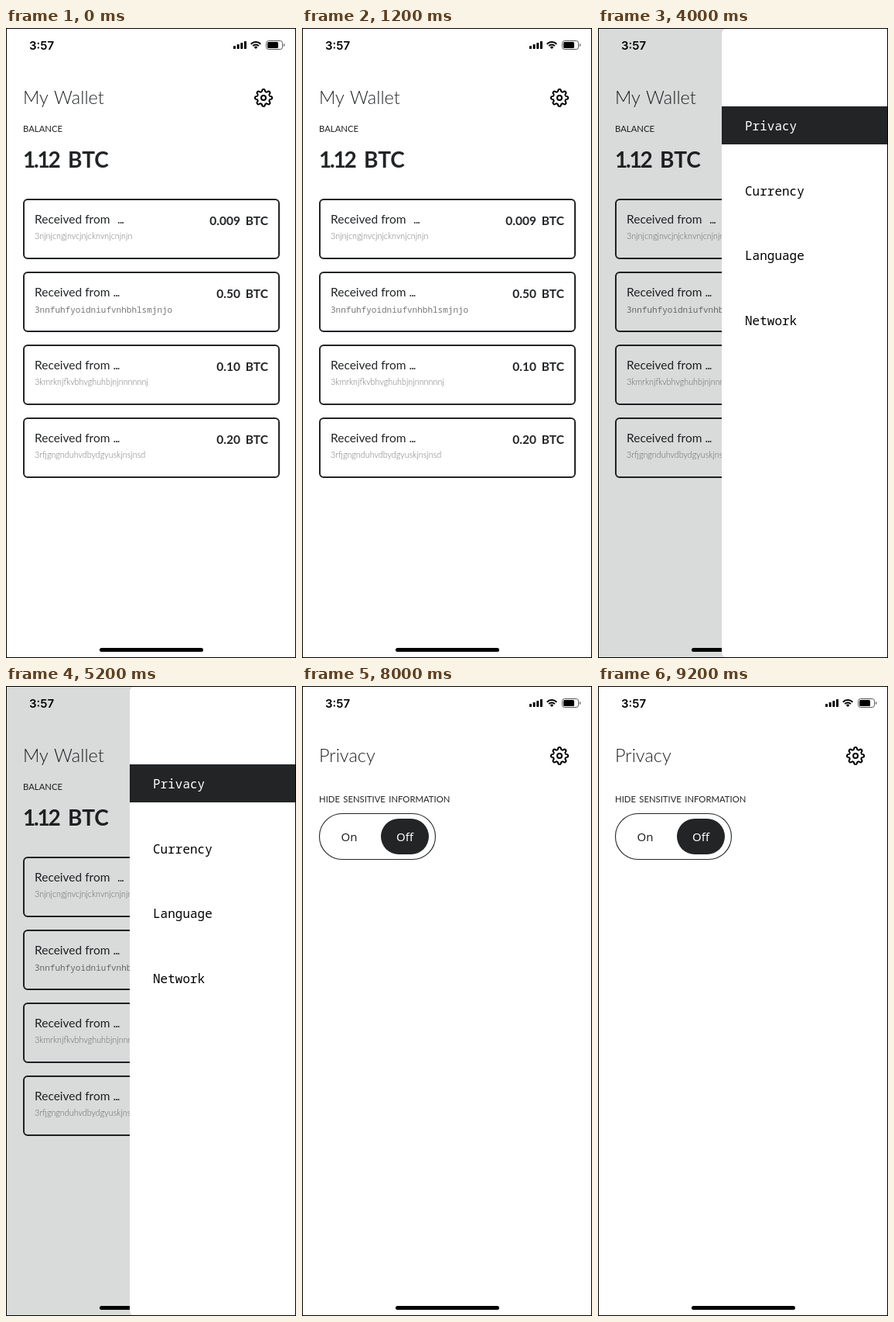
An HTML page that plays this animation: 375 px wide and 812 px high, repeating every 10000 ms.

```html
<!DOCTYPE html>
<html lang="en">
<head>
<meta charset="utf-8">
<title>Wallet privacy flow</title>
<style>
  html, body { margin: 0; width: 100%; height: 100%; overflow: hidden; background: #fff; }
  svg { display: block; width: 375px; height: 812px; }
  text { font-family: Lato, "Open Sans", sans-serif; fill: #222426; white-space: pre; }
  .clock { font: 600 15px Inter, sans-serif; fill: #000; }
  .title { font-size: 23.5px; font-weight: 300; word-spacing: 2px; }
  .label { font-size: 11.3px; word-spacing: 1.5px; }
  .total { font-size: 28px; font-weight: 700; }
  .amount { font-size: 15.5px; font-weight: 700; word-spacing: 3px; text-anchor: end; }
  .sender { font-size: 15.5px; }
  .address { font-size: 10.8px; font-weight: 300; fill: #777; }
  .mono { font: 300 11px "Noto Sans Mono", monospace; fill: #777; }
  .item { font: 400 16px "Noto Sans Mono", monospace; fill: #000; }
  .option { font: 400 15px "Noto Sans", sans-serif; text-anchor: middle; }
  .inverse { fill: #fff; }
  .line { fill: none; stroke: #222426; }
</style>
</head>
<body>
<svg id="stage" viewBox="0 0 375 812" xmlns="http://www.w3.org/2000/svg"></svg>
<script>
const INK = "#222426";
const STEP = 2000;

const rect = (x, y, w, h, attrs = "") =>
  `<rect x="${x}" y="${y}" width="${w}" height="${h}" ${attrs}/>`;
const text = (x, y, style, content) =>
  `<text x="${x}" y="${y}" class="${style}">${content}</text>`;
const group = (id, content) => `<g id="${id}">${content}</g>`;

function gear(cx, cy) {
  const points = Array.from({ length: 160 }, (_, i) => {
    const a = i / 160 * 2 * Math.PI;
    const r = 9.6 + 1.4 * Math.tanh(1.8 * Math.cos(8 * a)) / Math.tanh(1.8);
    return `${(cx + r * Math.cos(a)).toFixed(2)},${(cy + r * Math.sin(a)).toFixed(2)}`;
  });
  return `<g fill="none" stroke="#000" stroke-width="2" stroke-linejoin="round">
    <polygon points="${points.join(" ")}"/><circle cx="${cx}" cy="${cy}" r="3"/></g>`;
}

function wifi(cx, cy) {
  const arc = r => {
    const d = r * Math.SQRT1_2;
    return `M${cx - d} ${cy - d}A${r} ${r} 0 0 1 ${cx + d} ${cy - d}`;
  };
  return `<path d="${arc(8.9)}${arc(5.5)}" fill="none" stroke="#000" stroke-width="2"/>
    <path d="${arc(3.2)}L${cx} ${cy}Z"/>`;
}

function statusBar() {
  const bars = [4, 6, 8, 10]
    .map((h, i) => rect(294 + i * 4.65, 27 - h, 3, h, 'rx="0.8"')).join("");
  const battery = rect(336.5, 16.5, 21, 11, 'rx="3" fill="none" stroke="#555"')
    + rect(338, 18, 14, 8, 'rx="1.5"')
    + '<path d="M359 20q1.4 .6 1.4 2t-1.4 2z" fill="#555"/>';
  return text(30, 28, "clock", "3:57") + bars + wifi(323, 27) + battery;
}

function card(index, [amount, address, style, dotsX]) {
  const y = 220 + index * 94;
  return rect(23, y + 1, 330, 76, 'rx="5" class="line" stroke-width="2"')
    + text(37, y + 32, "sender", `Received from<tspan x="${dotsX}" letter-spacing="-1">...</tspan>`)
    + text(37, y + (style === "mono" ? 53 : 52), style, address)
    + text(339, y + 34, "amount", `${amount} BTC`);
}

const payments = [
  ["0.009", "3njnjcngjnvcjnjcknvnjcnjnjn", "address", 144],
  ["0.50", "3nnfuhfyoidniufvnhbhlsmjnjo", "mono", 138.5],
  ["0.10", "3kmrknjfkvbhvghuhbjnjnnnnnnj", "address", 138.5],
  ["0.20", "3rfjgngnduhvdbydgyuskjnsjnsd", "address", 138.5],
];

const wallet = text(22, 98, "title", "My Wallet")
  + text(22, 134, "label", "BALANCE")
  + text(22, 180, "total", '<tspan letter-spacing="-2.2">1.12</tspan><tspan x="80">BTC</tspan>')
  + payments.map((payment, i) => card(i, payment)).join("");

const privacy = text(22, 98, "title", "Privacy")
  + text(22, 150, "label", "HIDE SENSITIVE INFORMATION")
  + rect(22.5, 164.5, 150, 59, 'rx="29.5" class="line" stroke-width="1.1"')
  + rect(31, 171, 61, 46, `id="knob" rx="23" fill="${INK}"`)
  + '<text id="on" x="61" y="200" class="option">On</text>'
  + '<text id="off" x="133" y="200" class="option">Off</text>';

const menu = rect(1, 1, 373, 810, 'fill="rgb(0,13,7)" fill-opacity="0.15"')
  + rect(160, 1, 230, 810, 'rx="6" fill="#fff"')
  + rect(160, 101, 214, 49, `id="highlight" fill="${INK}"`)
  + ["Privacy", "Currency", "Language", "Network"]
    .map((name, i) => text(190, 132 + i * 83.67, "item", name)).join("");

const stage = document.getElementById("stage");
stage.innerHTML = rect(0, 0, 375, 812, 'fill="#fff"')
  + statusBar() + gear(333, 90)
  + rect(121, 799, 134, 5, 'rx="2.5"')
  + group("wallet", wallet) + group("privacy", privacy) + group("menu", menu)
  + rect(0.5, 0.5, 374, 811, 'fill="none" stroke="#000"');

const part = id => document.getElementById(id);
const show = (id, visible) => part(id).setAttribute("display", visible ? "inline" : "none");
const firstItem = part("menu").querySelector(".item");

function render(time) {
  const scene = Math.floor(time / STEP) % 5;
  const pressed = scene === 2;
  const isOff = scene === 4;
  show("wallet", scene < 3);
  show("menu", scene === 1 || pressed);
  show("highlight", pressed);
  firstItem.classList.toggle("inverse", pressed);
  firstItem.style.fill = pressed ? "#fff" : "#000";
  show("privacy", scene > 2);
  part("knob").setAttribute("x", isOff ? 102 : 31);
  part("knob").setAttribute("width", isOff ? 62 : 61);
  part("on").classList.toggle("inverse", !isOff);
  part("off").classList.toggle("inverse", isOff);
}

const start = performance.now();
function tick() {
  render(performance.now() - start);
  requestAnimationFrame(tick);
}
tick();
</script>
</body>
</html>
```
